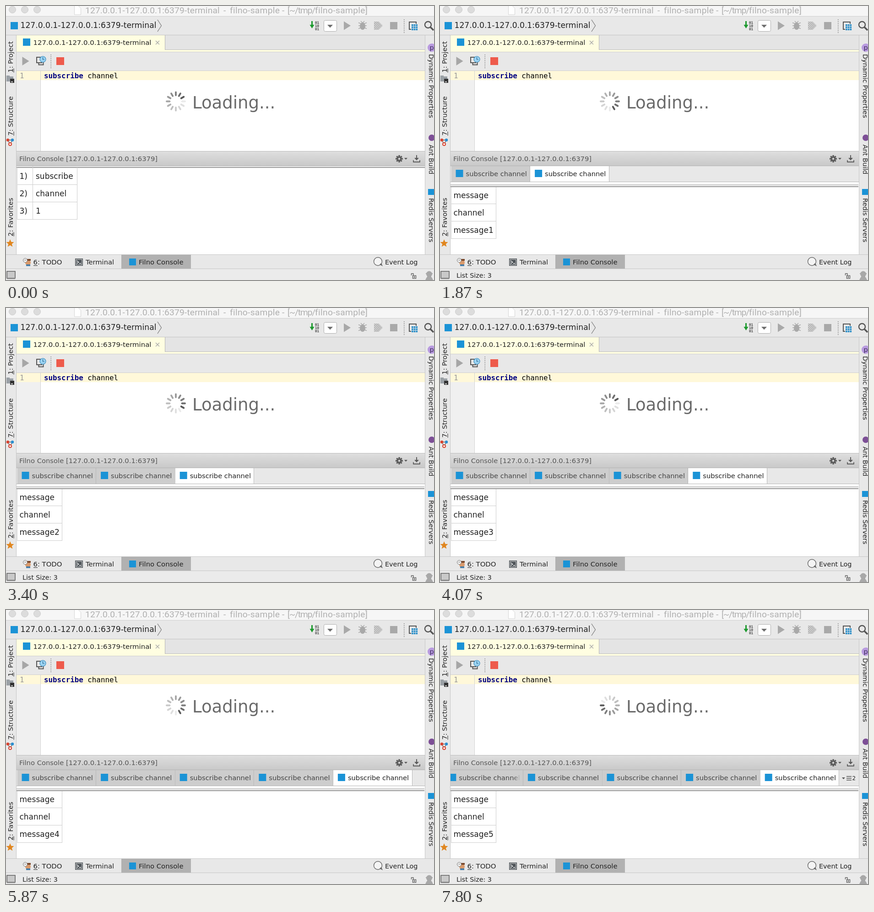
Recreate the animation shown at these times as an HTML page with a canvas. Size 935x599 px, loop 7870 ms.

```html
<!DOCTYPE html>
<html lang="en">
<head>
<meta charset="utf-8">
<title>Console</title>
<style>
html, body { margin: 0; width: 100%; height: 100%; overflow: hidden; background: #e8e8e8; }
canvas { display: block; }
</style>
</head>
<body>
<canvas id="stage" width="935" height="599"></canvas>
<script>
const c = document.getElementById('stage').getContext('2d');
const LOOP = 7870;
const SANS = '"DejaVu Sans", sans-serif';
const MONO = '"DejaVu Sans Mono", monospace';
const TITLE = 'Roboto, sans-serif';
const BLUE = '#1b93d6', PANEL = '#e8e8e8', INK = '#222';
const ADDRESS = '127.0.0.1-127.0.0.1:6379';

function rect(x, y, w, h, color) {
  c.fillStyle = color;
  c.fillRect(x, y, w, h);
}

function circle(x, y, r, fill, stroke, width = 1) {
  c.beginPath();
  c.arc(x, y, r, 0, Math.PI * 2);
  if (fill) { c.fillStyle = fill; c.fill(); }
  if (stroke) { c.strokeStyle = stroke; c.lineWidth = width; c.stroke(); }
}

function trace(points) {
  c.beginPath();
  points.forEach(([x, y], i) => i ? c.lineTo(x, y) : c.moveTo(x, y));
}

function poly(points, color) {
  trace(points);
  c.fillStyle = color;
  c.fill();
}

function line(points, color, width = 1) {
  trace(points);
  c.strokeStyle = color;
  c.lineWidth = width;
  c.stroke();
}

function frame(x, y, w, h, color, width = 1) {
  c.strokeStyle = color;
  c.lineWidth = width;
  c.strokeRect(x, y, w, h);
}

function text(str, x, y, size, color = INK, family = SANS, spacing = 0, weight = '') {
  c.font = `${weight} ${size}px ${family}`;
  c.letterSpacing = spacing + 'px';
  c.fillStyle = color;
  c.fillText(str, x, y);
}

// Text turned by a quarter; the first character may be underlined as a mnemonic.
function turned(str, x, y, dir, size, underline) {
  c.save();
  c.translate(x, y);
  c.rotate(dir * Math.PI / 2);
  text(str, 0, 0, size);
  if (underline) rect(0, 2, 9, 1, INK);
  c.restore();
}

function badge(x, y, size = 16) {
  rect(x, y, size, size, BLUE);
}

function play(x, y, color) {
  poly([[x, y], [x + 15, y + 9.5], [x, y + 19]], color);
}

function dots(x, top, bottom) {
  for (let y = top; y < bottom; y += 4) rect(x, y, 1.5, 2, '#8c8c8c');
}

function titleBar() {
  rect(0, 0, 935, 22, '#f6f6f6');
  for (const x of [14, 41, 68]) circle(x, 8, 7.5, '#dcdcdc', '#cdcdcd');
  poly([[149, 0], [159, 0], [164, 5], [164, 19], [149, 19]], '#fff');
  line([[149.5, 0], [149.5, 19], [163.5, 19], [163.5, 5], [158.5, 0]], '#d4d4d4');
  const gray = '#b0b0b0', y = 15.5, size = 19.2;
  text(ADDRESS + '-terminal', 173, y, size, gray, TITLE, 0.17);
  text('-', 475, y, size, gray, TITLE);
  text('filno-sample', 489, y, size, gray, TITLE, 0.3);
  text('-', 603, y, size, gray, TITLE);
  text('[~/tmp/', 615, y, size, gray, TITLE, -1.1);
  text('filno-sample]', 675, y, size, gray, TITLE, 0.35);
  rect(0, 22, 935, 1, '#cfcfcf');
}

function bug(x, y) {
  const gray = '#a9a9a9';
  for (const s of [-1, 1]) {
    for (const d of [-5, 0, 5]) line([[x, y + d * 0.6], [x + s * 9, y + d * 1.3]], gray, 1.5);
    line([[x, y - 6], [x + s * 4, y - 10]], gray, 1.5);
  }
  c.beginPath();
  c.ellipse(x, y + 1, 6, 8, 0, 0, Math.PI * 2);
  c.fillStyle = gray;
  c.fill();
}

function coverage(x, y) {
  c.save();
  trace([[x - 9, y - 9], [x + 1, y - 9], [x + 10, y], [x + 1, y + 9], [x - 9, y + 9]]);
  c.clip();
  for (let d = -30; d <= 30; d += 4.5) {
    line([[x + d - 10, y - 10], [x + d + 10, y + 10]], '#b2b2b2', 1.5);
    line([[x + d + 10, y - 10], [x + d - 10, y + 10]], '#b2b2b2', 1.5);
  }
  c.restore();
}

function mainToolbar() {
  rect(0, 23, 935, 41, PANEL);
  badge(10, 35);
  text(ADDRESS + '-terminal', 31.5, 48, 17.15);
  line([[331, 30], [339.5, 43], [331, 56]], '#777', 1.2);
  rect(667, 33, 3, 9, '#1d9a2f');
  poly([[663.5, 41], [673.5, 41], [668.5, 49]], '#1d9a2f');
  ['01', '10', '01'].forEach((s, i) => text(s, 675, 38.5 + i * 7, 7.5, '#444', MONO, 0, 'bold'));
  c.beginPath();
  c.roundRect(694.5, 31.5, 28, 24, 3);
  c.fillStyle = '#fff';
  c.fill();
  c.strokeStyle = '#adadad';
  c.lineWidth = 1;
  c.stroke();
  poly([[702, 41], [714, 41], [708, 47.5]], '#6e6e6e');
  play(738, 33.5, '#a9a9a9');
  bug(779, 43);
  coverage(813, 43);
  rect(839, 35, 16, 16, '#a9a9a9');
  dots(869, 29, 58);
  frame(881, 35, 15, 16, '#555', 2);
  rect(885, 39, 15, 15, PANEL);
  for (let i = 0; i < 3; i++) {
    for (let j = 0; j < 3; j++) rect(886 + i * 4.7, 40 + j * 4.7, 3.7, 3.7, '#2b8fc9');
  }
  circle(922, 41, 7, null, '#555', 2.4);
  line([[927, 46], [934, 53]], '#555', 3.5);
  rect(0, 63, 935, 1, '#c4c4c4');
}

function leftStripe() {
  rect(0, 64, 22, 479, PANEL);
  rect(22, 64, 1, 479, '#c6c6c6');
  turned('1: Project', 14.5, 145.5, -1, 14.5, true);
  turned('7: Structure', 14.5, 283.5, -1, 14.5, true);
  turned('2: Favorites', 14.5, 503.5, -1, 14.5, true);
  rect(1, 152, 7, 3, '#9aa0a5');
  rect(1, 154, 15, 11, '#9aa0a5');
  rect(9, 159, 9, 9, '#333');
  rect(11, 165, 4, 1.5, '#fff');
  line([[4, 293], [9, 302], [14, 293], [4, 293]], '#666', 1.5);
  circle(4, 293, 3.2, '#d8432f');
  circle(14, 293, 3.2, '#2b8fd0');
  circle(9, 302, 3, '#fff', '#d8432f', 2);
  const star = [];
  for (let i = 0; i < 10; i++) {
    const r = i % 2 ? 4 : 9, a = i * Math.PI / 5;
    star.push([9 + r * Math.sin(a), 519 - r * Math.cos(a)]);
  }
  poly(star, '#e0861f');
}

function rightStripe() {
  rect(915, 64, 20, 479, PANEL);
  rect(915, 64, 1, 479, '#c6c6c6');
  circle(930, 91, 9, '#b99be0');
  text('p', 925.5, 95.5, 14.5, '#3d2a5c');
  turned('Dynamic Properties', 924, 105, 1, 14.3);
  circle(930, 288, 7, '#7d4f96');
  turned('Ant Build', 924, 303, 1, 14.3);
  badge(922, 400, 13);
  turned('Redis Servers', 924, 420, 1, 14.2);
}

function editor() {
  rect(23, 64, 892, 32, '#e4e4e4');
  rect(348, 95, 567, 1, '#bdbdbd');
  rect(23, 64, 324, 32, '#fffee1');
  rect(347, 64, 1, 32, '#b4b4b4');
  rect(23, 96, 892, 4, '#fffee1');
  badge(37, 71);
  text(ADDRESS + '-terminal', 59.5, 85, 14.9);
  line([[327, 76], [335, 84]], '#aaa', 1.4);
  line([[335, 76], [327, 84]], '#aaa', 1.4);

  rect(23, 100, 892, 41, PANEL);
  rect(23, 100, 892, 1, '#cfcfcf');
  play(35.5, 111, '#a6a6a6');
  frame(71.5, 115.5, 10, 13, '#555', 2);
  rect(66, 111, 12, 13, PANEL);
  frame(67, 112, 11, 12, '#555', 2);
  circle(80.5, 116.5, 6.5, '#9cd3f2', '#3a8dbd', 1.2);
  line([[80.5, 112], [80.5, 117], [84, 117]], '#2d6c93', 1.2);
  dots(97.5, 106, 136);
  rect(110, 112, 17, 17, '#ee5b4c');

  rect(23, 141, 892, 177, '#fff');
  rect(23, 141, 52, 177, '#f0f0f0');
  rect(23, 142, 892, 20, '#fff8d9');
  rect(23, 141, 892, 1, '#d0d0d0');
  rect(75, 142, 1, 176, '#d2d2d2');
  text('1', 30, 158, 15.8, '#999', MONO);
  text('subscribe', 83, 158, 15.83, '#000080', MONO, 0, 'bold');
  text('channel', 178.3, 158, 15.83, '#000', MONO);
  text('Loading...', 407, 224, 37, '#6a6a6a');
}

// Twelve blades; the head rests briefly now and then and catches up as the turn ends.
function spinner(t) {
  const slot = Math.floor((t + 5) * 12 / 800) % 12;
  const head = 2 + Math.floor(slot * 0.85);
  c.save();
  c.translate(371, 208.5);
  c.lineCap = 'round';
  for (let i = 0; i < 12; i++) {
    const age = (head - i + 24) % 12;
    const v = Math.round(88 + 146 * Math.pow(age / 11, 0.8));
    const a = i * Math.PI / 6, sx = Math.sin(a), sy = -Math.cos(a);
    line([[13.5 * sx, 13.5 * sy], [20 * sx, 20 * sy]], `rgb(${v},${v},${v})`, 3.8);
  }
  c.restore();
}

function consoleHeader() {
  const g = c.createLinearGradient(0, 318, 0, 349);
  g.addColorStop(0, '#dedede');
  g.addColorStop(1, '#c9c9c9');
  rect(23, 318, 892, 31, g);
  rect(23, 317, 892, 1, '#bcbcbc');
  rect(23, 349, 892, 1, '#b4b4b4');
  text('Filno Console', 29, 339, 14.75, '#555');
  text('[' + ADDRESS + ']', 131, 339, 14.75, '#555');
  for (let i = 0; i < 4; i++) {
    const a = i * Math.PI / 4, x = 8 * Math.cos(a), y = 8 * Math.sin(a);
    line([[859 - x, 334 - y], [859 + x, 334 + y]], '#5c5c5c', 3.4);
  }
  circle(859, 334, 5.5, '#5c5c5c');
  circle(859, 334, 2.2, '#d4d4d4');
  poly([[870, 332], [877, 332], [873.5, 336]], '#5c5c5c');
  rect(896, 326, 2, 8, '#5c5c5c');
  poly([[892, 332], [902, 332], [897, 337.5]], '#5c5c5c');
  line([[890, 337], [890, 341], [904, 341], [904, 337]], '#5c5c5c', 1.8);
}

function cells(top, right, rows, split) {
  const grid = '#cdcdcd';
  rect(24, top, 1, rows.length * 38, grid);
  rect(right, top, 1, rows.length * 38, grid);
  rows.forEach((row, i) => {
    const y = top + i * 38;
    rect(24, y + 37, right - 23, 1, grid);
    if (split) text(`${i + 1})`, 29.5, y + 25, 17);
    text(row, split ? 65 : 29.5, y + 25, 17);
  });
  if (split) rect(split, top - 3, 1, rows.length * 38 + 3, grid);
}

function resultTabs(step) {
  const full = step === 5, count = full ? 5 : step + 1;
  const start = full ? 9.3 : 24.5, width = 172.6;
  rect(23, 350, 892, 35, PANEL);
  c.save();
  c.beginPath();
  c.rect(23, 350, 892, 35);
  c.clip();
  for (let i = 0; i < count; i++) {
    const x = start + i * width, active = i === count - 1;
    rect(x, 350, width, 35, active ? '#fff' : '#cdcdcd');
    rect(Math.round(x + width - 1), 350, 1, 35, '#b5b5b5');
    badge(x + 10, 358);
    let ink = active ? INK : '#444';
    if (full && i === 0) {
      ink = c.createLinearGradient(160, 0, 176, 0);
      ink.addColorStop(0, '#444');
      ink.addColorStop(1, '#cdcdcd');
    }
    text('subscribe channel', x + 32, 371.5, 14.7, ink);
  }
  c.restore();
  if (full) {
    poly([[878, 366], [885, 366], [881.5, 370]], '#555');
    for (let y = 363; y < 373; y += 4) rect(888, y, 11, 1.5, '#555');
    text('2', 900.5, 372, 12);
  }
  rect(23, 384, 892, 1, '#b5b5b5');
}

function divider(y) {
  rect(23, y, 891, 1, '#b4b4b4');
  rect(23, y + 1, 891, 3, '#e6e6e6');
  rect(23, y + 4, 891, 2, '#9e9e9e');
}

function results(step) {
  rect(23, 350, 892, 193, '#fff');
  if (step === 0) {
    rect(23, 350, 892, 2, '#eee');
    rect(23, 352, 892, 2, '#9e9e9e');
    cells(353, 155, ['subscribe', 'channel', '1'], 58);
  } else {
    resultTabs(step);
    cells(395, 122, ['message', 'channel', 'message' + step]);
    divider(390);
  }
}

function bottomBar() {
  rect(0, 543, 935, 31, PANEL);
  rect(0, 543, 935, 1, '#c6c6c6');
  rect(252, 544, 152, 30, '#b1b1b1');
  circle(48, 561, 6, '#d99a6c');
  rect(44, 553, 10, 4, '#7b4a2d');
  rect(44, 565, 9, 3.5, '#3f79a6');
  circle(42, 556, 4.5, '#f2f2f2', '#777');
  rect(40, 555, 4, 1, '#777');
  text('6: TODO', 59.5, 564.5, 14.8);
  rect(60, 567, 9, 1, INK);
  rect(151, 552, 17, 16, '#4e5459');
  frame(153, 554, 13, 12, '#e4e4e4');
  line([[155, 557], [158.5, 560], [155, 563]], '#fff', 1.4);
  rect(160, 562, 4, 1.4, '#fff');
  text('Terminal', 174, 564.5, 14.7);
  badge(269, 552, 15);
  text('Filno Console', 290, 564.5, 14.8);
  circle(812.5, 558.5, 9, '#f4f4f4', '#666', 1.4);
  poly([[816, 565], [823, 569], [820, 562]], '#666');
  text('Event Log', 828, 564.5, 14.4);
}

function statusBar(step) {
  rect(0, 574, 935, 25, '#ebebeb');
  rect(0, 574, 935, 1, '#c6c6c6');
  rect(2, 580, 18, 17, '#c9c9c9');
  frame(2, 580, 18, 15, '#666', 1.6);
  rect(2, 594, 18, 3, '#8a8a8a');
  if (step) text('List Size: 3', 36, 594, 14.2);
  frame(888.5, 589.5, 7, 6, '#666', 1.5);
  rect(891, 591, 2, 3, '#666');
  line([[885.5, 589], [885.5, 585], [890, 585], [890, 589]], '#666', 1.4);
  const gray = '#a8a8a8';
  circle(924.5, 586, 6.5, gray);
  rect(917, 584, 15, 2, gray);
  rect(920, 588, 9, 6, gray);
  poly([[916, 599], [919, 593], [930, 593], [933, 599]], gray);
}

function draw(t) {
  const step = t < 400 ? 0 : Math.min(5, Math.floor((t - 400) / 1600) + 1);
  titleBar();
  mainToolbar();
  leftStripe();
  editor();
  spinner(t);
  consoleHeader();
  results(step);
  rightStripe();
  bottomBar();
  statusBar(step);
}

const begin = performance.now();
function tick() {
  draw((performance.now() - begin) % LOOP);
  requestAnimationFrame(tick);
}
tick();
</script>
</body>
</html>
```
